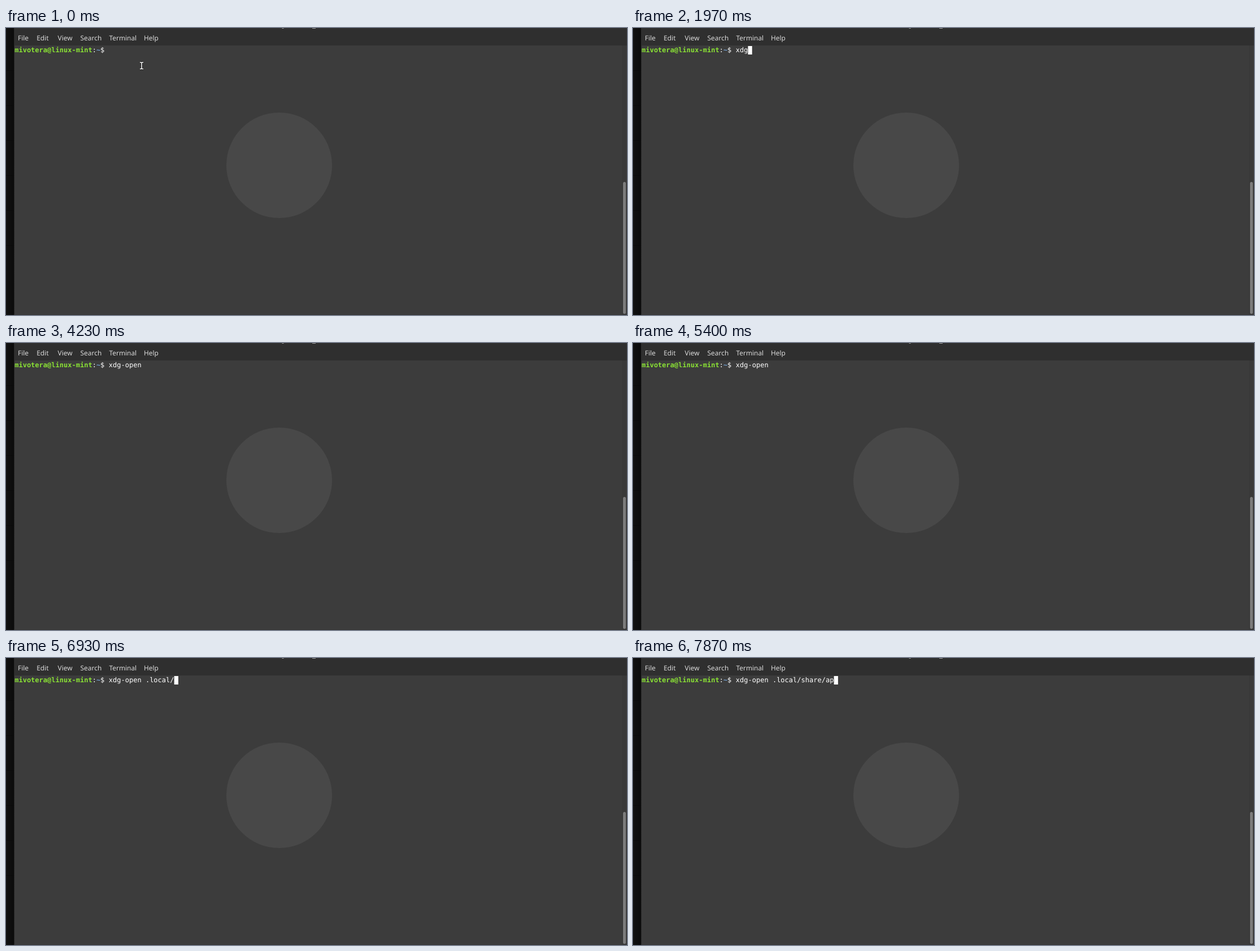
An HTML page that plays this animation: 1099x509 px, repeating every 8 s.

```html
<!DOCTYPE html>
<html lang="en">
<head>
<meta charset="utf-8">
<title>Terminal</title>
<style>
  html, body { margin: 0; width: 100%; height: 100%; overflow: hidden; background: #3c3c3c; }
  svg { display: block; width: 1099px; height: 509px; }
  text { white-space: pre; text-rendering: geometricPrecision; }
  .menu { font: 11.9px "Noto Sans", sans-serif; fill: #dadada; }
  .term { font: 12.03px "DejaVu Sans Mono", monospace; fill: #fff; }
  .user { font-weight: bold; fill: #8ae234; }
  .path { font-weight: bold; fill: #729fcf; }
</style>
</head>
<body>
<svg viewBox="0 0 1099 509">
  <defs>
    <linearGradient id="desk">
      <stop offset="0" stop-color="#111"/>
      <stop offset="1" stop-color="#0b0b0b"/>
    </linearGradient>
    <path id="beam" d="M237 61h2l1 1 1-1h2M240 62v9.5M237 72.5h2l1-1 1 1h2"/>
  </defs>

  <rect width="1099" height="509" fill="#3c3c3c"/>
  <rect width="14.5" height="509" fill="url(#desk)"/>
  <path d="M7 75v320" stroke="#0a0a0a" stroke-width="14" stroke-dasharray="1 61"/>
  <rect x="14.5" width="1084.5" height="31" fill="#2f2f2f"/>
  <path d="M488.5 0h3M542 0h6" stroke="#c8c8c8" stroke-width="1.6"/>

  <g class="menu">
    <text x="21" y="22.3">File</text>
    <text x="54.2" y="22.3">Edit</text>
    <text x="91.6" y="22.3">View</text>
    <text x="131.6" y="22.3">Search</text>
    <text x="182.5" y="22.3">Terminal</text>
    <text x="244" y="22.3">Help</text>
  </g>

  <circle cx="483.5" cy="243.5" r="93.5" fill="#484848"/>

  <rect x="1090" y="31" width="9" height="478" fill="#393939"/>
  <rect x="1092" y="273" width="5" height="234" rx="2.5" fill="#7c7c7c"/>
  <rect x="14.5" y="508" width="1084.5" height="1" fill="#343434"/>

  <text class="term" x="15.2" y="43.4"><tspan class="user">mivotera@linux-mint</tspan>:<tspan class="path">~</tspan>$</text>
  <text class="term" id="command" x="181.8" y="43.4"></text>
  <rect id="cursor" y="32" width="7.24" height="15" fill="#fff"/>

  <g id="pointer" fill="none">
    <use href="#beam" stroke="#1c1c1c" stroke-width="3.4"/>
    <use href="#beam" stroke="#fff" stroke-width="1.5"/>
  </g>
</svg>

<script>
  const LOOP = 8000, CELL = 7.2427, START = 181.8;
  const BLINK = 590;  // half a blink period, restarted by each key press
  const ECHO = 40;    // delay from key press to text

  // Bursts of even typing; a longer piece is a tab completion.
  const bursts = [
    { start: 1130, gap: 420, pieces: ["x", "d", "g"] },
    { start: 3130, gap: 270, pieces: ["-", "o", "pen "] },
    { start: 5470, gap: 220, pieces: [".", "l", "o", "cal/"] },
    { start: 6970, gap: 133, pieces: ["s", "h", "a", "re/"] },
    { start: 7730, gap: 140, pieces: ["a", "p"] }
  ];
  const keys = bursts.flatMap(({ start, gap, pieces }) =>
    pieces.map((text, i) => ({ text, time: start + i * gap })));

  const command = document.getElementById("command");
  const cursor = document.getElementById("cursor");
  const pointer = document.getElementById("pointer");
  const show = (el, on) => el.setAttribute("visibility", on ? "visible" : "hidden");

  function draw(time) {
    const typed = keys.filter(key => key.time <= time).map(key => key.text).join("");
    const pressed = keys.findLast(key => key.time - ECHO <= time);
    const since = pressed ? time - pressed.time + ECHO : time + BLINK + 20;

    command.textContent = typed;
    cursor.setAttribute("x", START + typed.length * CELL);
    show(cursor, Math.floor(since / BLINK) % 2 === 0);
    show(pointer, typed === "");
  }

  const origin = performance.now();
  function tick() {
    draw((performance.now() - origin) % LOOP);
    requestAnimationFrame(tick);
  }
  tick();
</script>
</body>
</html>
```
